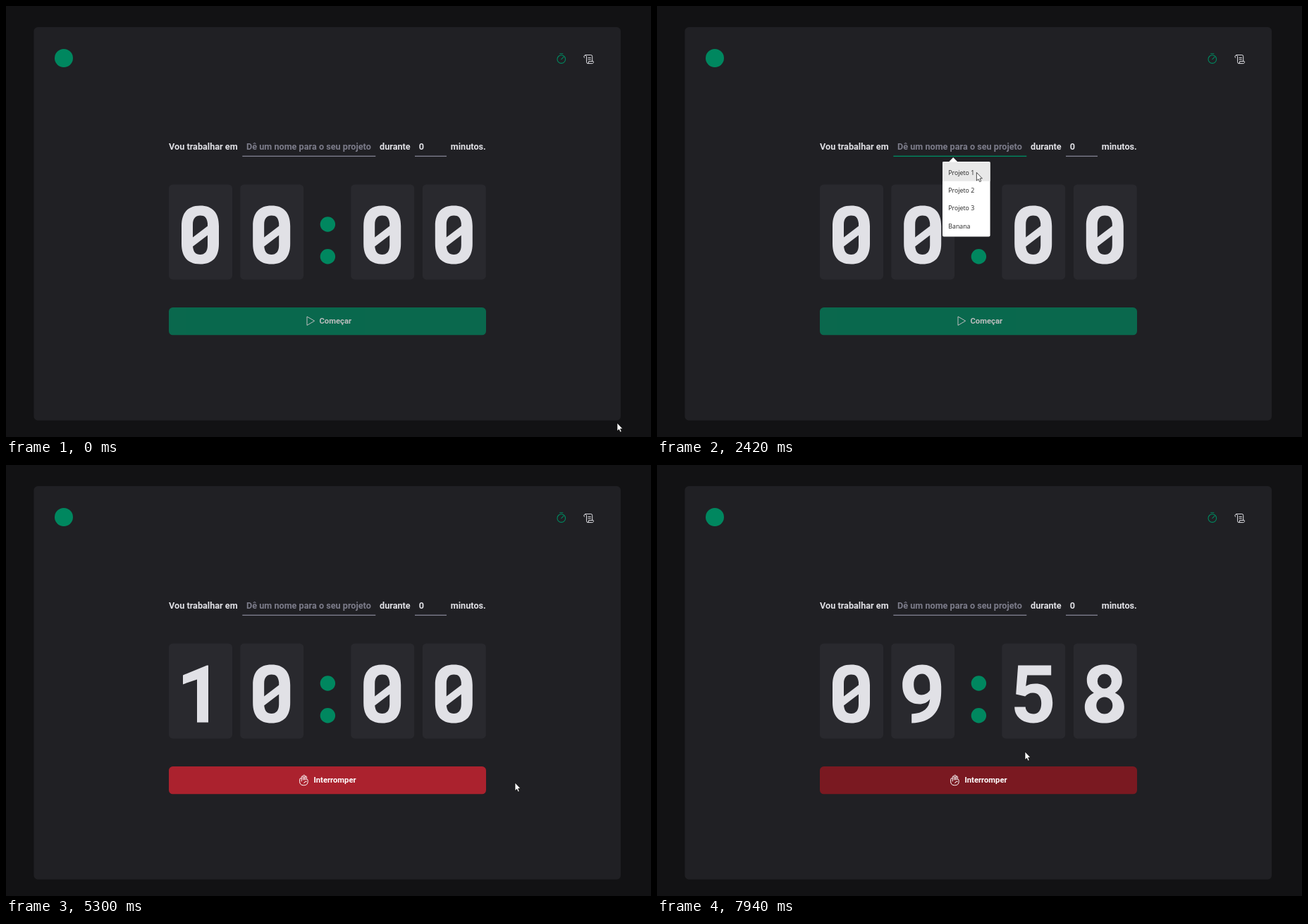
Animation, 915 px wide and 612 px high, one loop 8000 ms. Source, as an HTML page:

```html
<!DOCTYPE html>
<html lang="pt">
<head>
<meta charset="utf-8">
<style>
html, body { margin: 0; width: 100%; height: 100%; overflow: hidden; background: #121214; }
svg { display: block; }
text { font: 700 12.66px Roboto, sans-serif; fill: #e1e1e6; white-space: pre; }
.btn text { font-size: 11.25px; fill: #fff; }
.menu text { font: 400 8.8px "Open Sans", "Noto Sans", sans-serif; fill: #222; }
.line { fill: none; stroke: #e1e1e6; stroke-width: 1; stroke-linecap: round; stroke-linejoin: round; }
.digit { fill: #e1e1e6; fill-rule: evenodd; }
.arrow { fill: #fff; stroke: #000; stroke-width: .7; }
</style>
</head>
<body>
<svg width="915" height="612" viewBox="0 0 915 612">
  <rect x="39.5" y="30" width="832.5" height="558.5" rx="5.6" fill="#202024"/>
  <circle cx="82" cy="74" r="13" fill="#00875f"/>

  <g class="line" style="stroke:#00875f;stroke-width:1.1">
    <circle cx="787.8" cy="75.6" r="5.8"/>
    <path d="M785.7 67.7h4.2M787.8 75.6l3-3"/>
  </g>
  <path class="line" stroke-width="1.2" d="M820.4 73.4a1.9 1.9 0 1 1 3.2-1.5v7.7a2 2 0 0 0 2 2h6a1.9 1.9 0 0 0 1.6-3h-6.6q.6 2.9-1.4 3M821.7 69.6h8.1a1.9 1.9 0 0 1 1.9 1.9v7M826 73.4h3.4M826 75.9h3.4"/>

  <text x="231" y="204.3">Vou trabalhar em</text>
  <text x="530" y="204.3">durante</text>
  <text x="630.8" y="204.3">minutos.</text>
  <text id="project" x="341" y="203.6"></text>
  <text id="minutes" x="585.7" y="203.6"></text>
  <rect id="projectLine" x="335.3" y="212.6" width="189" height="1.4"/>
  <rect id="minutesLine" x="580" y="212.6" width="45" height="1.4"/>
  <rect id="caret" y="193" width="1" height="14" fill="#e1e1e6"/>
  <g id="spinner">
    <rect x="608.7" y="191.3" width="11.2" height="16.6" fill="#efefef"/>
    <path d="M611.7 197.6l2.6-3.2 2.6 3.2zM611.7 201.7l2.6 3.2 2.6-3.2z" fill="#333"/>
  </g>

  <g id="clock"></g>
  <g fill="#00875f"><circle cx="456.4" cy="310" r="10.7"/><circle cx="456.4" cy="355.8" r="10.7"/></g>

  <g id="button" class="btn">
    <rect id="face" x="231" y="428" width="450" height="39.3" rx="5.6"/>
    <g id="start">
      <path class="line" style="stroke:#fff" d="M427 441.4v12l10.3-6z"/>
      <text x="444.5" y="451.2">Começar</text>
    </g>
    <g id="stop">
      <path class="line" style="stroke:#fff" d="M419.2 449v-6a1.2 1.2 0 0 1 2.4 0v4.3v-5.8a1.2 1.2 0 0 1 2.4 0v5.8v-4.3a1.2 1.2 0 0 1 2.4 0v3.8q1.8-1 1.8 1v2q-.2 5-5.8 5q-5.5 0-5.8-5v-3.5q0-1.3 1.3-1.3h1.3M422.6 451.6q.4-2.4 3.6-2.3"/>
      <text x="436.5" y="451.2">Interromper</text>
    </g>
  </g>

  <g id="menu" class="menu">
    <path d="M413.8 221.5l6.4-6.5 6.4 6.5z" fill="#fff"/>
    <rect x="405" y="221" width="67.6" height="106.4" rx="2" fill="#fff"/>
    <rect id="rowHover" x="405" y="221.5" width="67.6" height="27.2" fill="#e8e8e8"/>
  </g>

  <g id="cursor">
    <path class="arrow" d="M0 0V11.6L2.6 9.3L4.4 13.2L6.3 12.3L4.6 8.5H8Z"/>
    <path d="M-2.5-5.5H-.7L0-5L.7-5.5H2.5M0-5V5M-2.5 5.5H-.7L0 5L.7 5.5H2.5" fill="none" stroke="#ccc"/>
    <path class="arrow" d="M-1 .8Q0-.6 1 .8V6L5 7Q6.4 7.4 6.2 9L5.3 14.8H-1.6L-5 9.2Q-4.6 7.2-3 8.4L-1 10Z"/>
  </g>
</svg>
<script>
const $ = id => document.getElementById(id);
const LOOP = 8000, ARROW = 0, BEAM = 1, HAND = 2;
const GREEN = [0, 135, 95], GREEN_DARK = [1, 95, 67];
const RED = [171, 34, 46], RED_DARK = [122, 25, 33];

const glyphs = {
  0: 'M18 59C18 40 27 30 44.5 30S71 40 71 59V84C71 103 62 113 44.5 113S18 103 18 84Z' +
     'M34 75V57C34 48 38 44 44.5 44C51 44 54 47 55 55V59Z' +
     'M55 72V86C55 95 51 99.5 44.5 99.5C38 99.5 35 96 34 88Z',
  1: 'M56 31V112H40V51L20 58V45L54 31Z',
  5: 'M23 31H70V45H36L34 60.5C38 58 42 57 48 57C63 57 72 67 72 84C72 102 61 113 45 113' +
     'C29 113 18 104 18 90H33.5C34 96 38 100 45 100C52 100 56 94 56 85C56 76 52 70 44 70' +
     'C39 70 36 72 33 75L20 72Z',
  8: 'M44 30C59 30 69 38 69 52C69 60 65 66 59 70C67 74 72 81 72 90C72 105 60 113 44 113' +
     'S16 105 16 90C16 81 21 74 29 70C23 66 19 60 19 52C19 38 29 30 44 30Z' +
     'M44 43A9.5 10 0 0 0 44 64A9.5 10 0 0 0 44 43ZM44 76A11.5 12 0 0 0 44 100A11.5 12 0 0 0 44 76Z',
  9: 'M44 30C61 30 71 42 71 61V68C71 97 57 112 29 113V100C46 99 54 92 55 79C51 84 46 86 40 86' +
     'C25 86 16 75 16 59C16 42 27 30 44 30Z' +
     'M44 43C37 43 32 49 32 58C32 67 36 73 43 73C48 73 53 70 55 66V59C55 49 50 43 44 43Z'
};

// time, x, y, pointer shape
const path = [
  [0, 867, 592, ARROW], [70, 866, 591, ARROW], [250, 800, 500, ARROW], [450, 640, 340, ARROW],
  [620, 505, 235, ARROW], [720, 455, 200, BEAM], [800, 446, 197, BEAM], [920, 446, 198, BEAM],
  [990, 454, 203, BEAM], [1240, 454, 203, BEAM], [1400, 453, 222, ARROW], [1600, 453, 236, ARROW],
  [1670, 453, 239, ARROW], [2400, 453, 239, ARROW], [2620, 457, 212, BEAM], [2760, 460, 199, BEAM],
  [2950, 460, 199, BEAM], [3200, 535, 196, BEAM], [3450, 608.5, 195, BEAM], [3520, 612, 194, ARROW],
  [3720, 613, 194, ARROW], [4200, 613, 194, ARROW], [4270, 609, 193, BEAM], [4460, 609, 193, BEAM],
  [4680, 502.7, 392, BEAM], [4800, 486, 440, HAND], [4900, 488, 449, HAND], [5110, 495, 451, HAND],
  [5230, 650, 453, HAND], [5290, 722, 451, ARROW], [5500, 723, 452, ARROW], [5840, 722, 446, ARROW],
  [6690, 721, 446, ARROW], [6830, 680, 441, HAND], [7000, 560, 427, ARROW], [7250, 420, 402, ARROW],
  [7400, 405, 424, ARROW], [7440, 415.5, 437, HAND], [7475, 415.5, 437, HAND], [7530, 385, 430, HAND],
  [7600, 362, 392, ARROW], [7690, 390, 432, HAND], [7780, 424, 456, HAND], [7870, 480, 436, HAND],
  [7930, 522, 407, ARROW], [8000, 522, 407, ARROW]
];

const SELECT = 2480, FOCUS = 780, MINUTES = 3860, BEGIN = 5090;
const hovers = [[4790, BEGIN], [BEGIN, 5260], [6840, 7010], [7470, LOOP]];

const cards = [231, 332.2, 489.2, 590.8].map(x => {
  $('clock').insertAdjacentHTML('beforeend',
    `<g transform="translate(${x} 253.4)"><rect width="90" height="135" rx="5.6" fill="#29292e"/><path class="digit"/></g>`);
  return $('clock').lastChild.lastChild;
});
['Projeto 1', 'Projeto 2', 'Projeto 3', 'Banana'].forEach((name, i) =>
  $('menu').insertAdjacentHTML('beforeend', `<text x="413.3" y="${239.8 + i * 25.3}">${name}</text>`));

const show = (el, on) => el.style.display = on ? '' : 'none';
const within = (t, a, b) => t >= a && t < b;

function pointer(t) {
  const i = path.findIndex(k => k[0] > t);
  const [t0, x0, y0, shape] = path[i - 1], [t1, x1, y1] = path[i];
  const u = (t - t0) / (t1 - t0);
  return [x0 + (x1 - x0) * u, y0 + (y1 - y0) * u, shape];
}

function faceColor(t, running) {
  const [base, dark] = running ? [RED, RED_DARK] : [GREEN, GREEN_DARK];
  const span = hovers.find(([a, b]) => within(t, a, b));
  const u = !span ? 0 : span[0] === BEGIN ? 1 : Math.min(1, (t - span[0]) / 80);
  return `rgb(${base.map((c, i) => c + (dark[i] - c) * u)})`;
}

function draw(t) {
  const running = t >= BEGIN;
  const chosen = within(t, SELECT, BEGIN);
  const onProject = within(t, FOCUS, MINUTES), onMinutes = within(t, MINUTES, BEGIN);
  const [x, y, shape] = pointer(t);

  $('project').textContent = chosen ? 'Projeto 1' : 'Dê um nome para o seu projeto';
  $('project').style.fill = chosen ? '#e1e1e6' : '#7c7c8a';
  $('minutes').textContent = running || t < MINUTES ? '0' : t < 4130 ? '5' : '10';
  $('projectLine').style.fill = onProject ? '#00875f' : '#7c7c8a';
  $('minutesLine').style.fill = onMinutes ? '#00875f' : '#7c7c8a';
  $('caret').setAttribute('x', chosen ? 393 : 341);
  show($('caret'), onProject && (t - (chosen ? SELECT : 860)) % 1000 < 500);
  show($('spinner'), within(t, 3400, BEGIN));

  const time = !running ? '0000' : t < 6100 ? '1000' : t < 7100 ? '0959' : '0958';
  cards.forEach((card, i) => card.setAttribute('d', glyphs[time[i]]));

  $('face').style.fill = faceColor(t, running);
  $('button').style.opacity = chosen || running ? 1 : .7;
  show($('start'), !running);
  show($('stop'), running);
  show($('menu'), within(t, 820, SELECT));
  show($('rowHover'), within(t, 1400, SELECT));

  $('cursor').setAttribute('transform', `translate(${x} ${y})`);
  [...$('cursor').children].forEach((el, i) => show(el, i === shape));
}

const began = performance.now();
(function tick() {
  draw((performance.now() - began) % LOOP);
  requestAnimationFrame(tick);
})();
</script>
</body>
</html>
```
